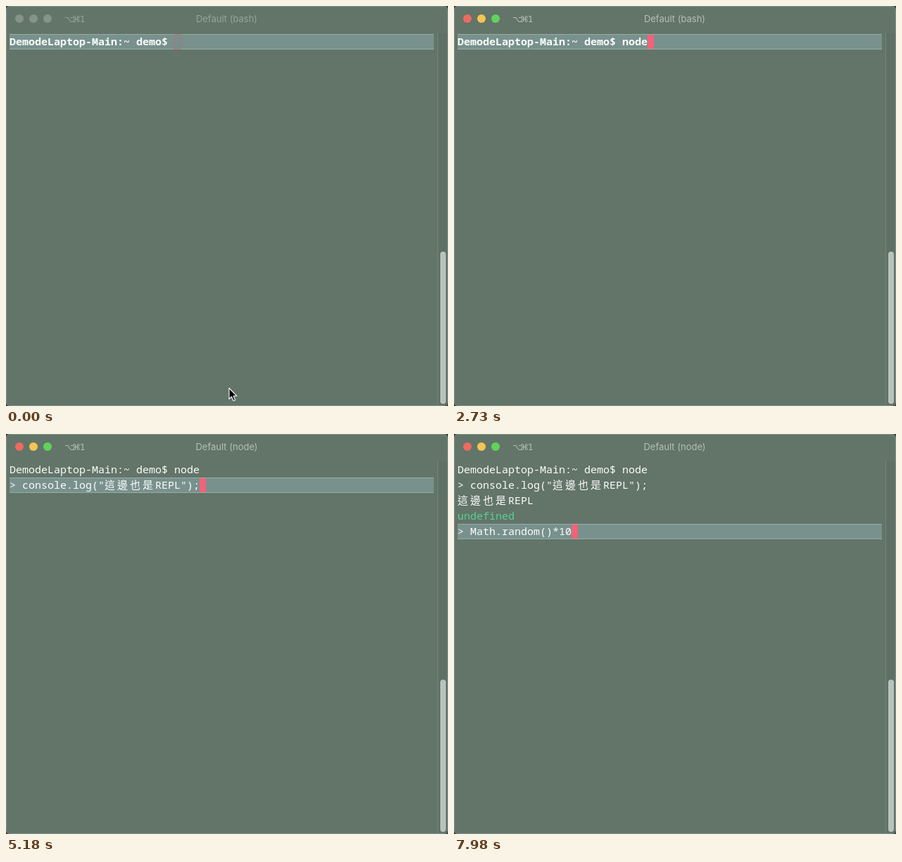
Animation, 628 px wide and 570 px high, one loop 8000 ms. Source, as an HTML page:

```html
<!DOCTYPE html>
<html lang="zh-Hant">
<head>
<meta charset="utf-8">
<title>Terminal</title>
<style>
  html, body { margin: 0; width: 100%; height: 100%; overflow: hidden; background: #34403a; }
  svg { display: block; width: 628px; height: 570px; }
  text { white-space: pre; }
  .row { font: 500 15px "Noto Sans Mono", "DejaVu Sans Mono", monospace; fill: #fbfdfb; }
  .row.strong { font-weight: 600; }
  .wide { font-family: "Noto Sans CJK TC", "Noto Sans CJK", sans-serif; letter-spacing: 3px; }
  .result { fill: #56d294; }
  .title { font: 13px Inter, Roboto, sans-serif; text-anchor: middle; }
  .keys { font: 12px "DejaVu Sans", Inter, sans-serif; }
  .bar { fill: #b5c0b8; }
  .idle .bar { fill: #97a59c; }
  .idle .light { fill: #85948b; }
</style>
</head>
<body>
<svg id="stage" viewBox="0 0 628 570">
  <rect x=".5" y=".5" width="627" height="569" rx="5" fill="#637469" stroke="#80948a"/>
  <circle class="light" cx="19" cy="18" r="6" fill="#ed6b60"/>
  <circle class="light" cx="39" cy="18" r="6" fill="#f4c64f"/>
  <circle class="light" cx="59" cy="18" r="6" fill="#60d35c"/>
  <text class="keys bar" x="83 94 105" y="23">⌥⌘1</text>
  <text class="title bar" id="title" x="313.5" y="23"></text>

  <rect x="613" y="38" width="14" height="531" fill="#5f7066"/>
  <rect x="613" y="38" width="1" height="531" fill="#73847a"/>
  <rect x="617" y="350" width="8" height="217" rx="4" fill="#b9c2bc"/>

  <g id="active">
    <rect x="5" y="40" width="603" height="22" fill="#78918c"/>
    <path d="M5 40.5H608M5 61.5H608" stroke="#94aea8"/>
  </g>
  <rect id="caret" y="41" width="9" height="20"/>
  <g id="rows"></g>

  <path id="arrow" d="M0 0V15.5L3.6 12.2 6 18 8.6 16.9 6.2 11.3H11Z"
        fill="#050505" stroke="#fff" stroke-width="1.1" stroke-linejoin="round"/>
  <g id="beam" fill="none">
    <path d="M358.5 317.5Q362 317.5 362 320V330Q362 332.5 358.5 332.5M365.5 317.5Q362 317.5 362 320M362 330Q362 332.5 365.5 332.5" stroke="#f4f6f4" stroke-width="2"/>
    <path d="M365.5 317.5Q362.5 317.5 362.5 320V330Q362.5 332.5 365.5 332.5M361 325.5H364" stroke="#151a17"/>
  </g>
</svg>
<script>
const LOOP = 8000, CELL = 9, LINE = 22, LEFT = 5;
const FOCUS = 560, TYPING = 1400, LAUNCH = 2800;
const $ = id => document.getElementById(id);
const [stage, title, active, caret, rows, arrow, beam] =
  ['stage', 'title', 'active', 'caret', 'rows', 'arrow', 'beam'].map($);

const shell = 'DemodeLaptop-Main:~ demo$ ';
const launched = shell + 'node';
const random = '> Math.random()*10';
const log = '> console.log("這邊也是REPL");';
const done = [launched, log, '這邊也是REPL', 'undefined'];

// The last row of each state holds the caret.
const states = [
  [0, [shell]],
  [TYPING, [shell + 'n']],
  [1540, [shell + 'no']],
  [1750, [shell + 'nod']],
  [2030, [launched]],
  [LAUNCH, [launched, '']],
  [2870, [launched, '> ']],
  [3290, [launched, random]],
  [4270, [launched, log]],
  [5320, [...done, '> ']],
  [6440, [...done, log]],
  [6650, [...done, random]]
];
const blinks = [[FOCUS, 840], [7350, 7770]];

const isWide = c => c > '\u2fff';
const columns = s => [...s].reduce((n, c) => n + (isWide(c) ? 2 : 1), 0);
const markup = s => s.replace(/>/g, '&gt;')
  .replace(/[\u3000-\u9fff]+/g, '<tspan class="wide">$&</tspan>');

function rowMarkup(text, i, list) {
  const kind = text === 'undefined' ? 'result' : list.length === 1 ? 'strong' : '';
  return `<text class="row ${kind}" x="${LEFT}" y="${56 + i * LINE}">${markup(text)}</text>`;
}

let shown;
function showRows(state) {
  if (state === shown) return;
  shown = state;
  const list = state[1], last = list.length - 1;
  rows.innerHTML = list.map(rowMarkup).join('');
  active.setAttribute('transform', `translate(0 ${last * LINE})`);
  caret.setAttribute('transform',
    `translate(${LEFT + columns(list[last]) * CELL} ${last * LINE})`);
}

const show = (el, on) => el.setAttribute('visibility', on ? 'visible' : 'hidden');

function draw(t) {
  const idle = t < FOCUS;
  stage.classList.toggle('idle', idle);
  title.textContent = t < LAUNCH ? 'Default (bash)' : 'Default (node)';
  showRows(states.findLast(s => s[0] <= t));

  caret.setAttribute('fill', idle ? 'none' : '#f2637a');
  caret.setAttribute('stroke', idle ? '#b96b78' : 'none');
  show(caret, !blinks.some(([from, to]) => t >= from && t < to));

  const p = Math.min(1, Math.max(0, (t - 35) / 455));
  const ease = p * p * (3 - 2 * p);
  arrow.setAttribute('transform', `translate(${317 + 45 * ease} ${544.5 - 219.5 * ease})`);
  show(arrow, idle);
  show(beam, !idle && t < TYPING);
}

function tick() {
  draw(performance.now() % LOOP);
  requestAnimationFrame(tick);
}
tick();
</script>
</body>
</html>
```
